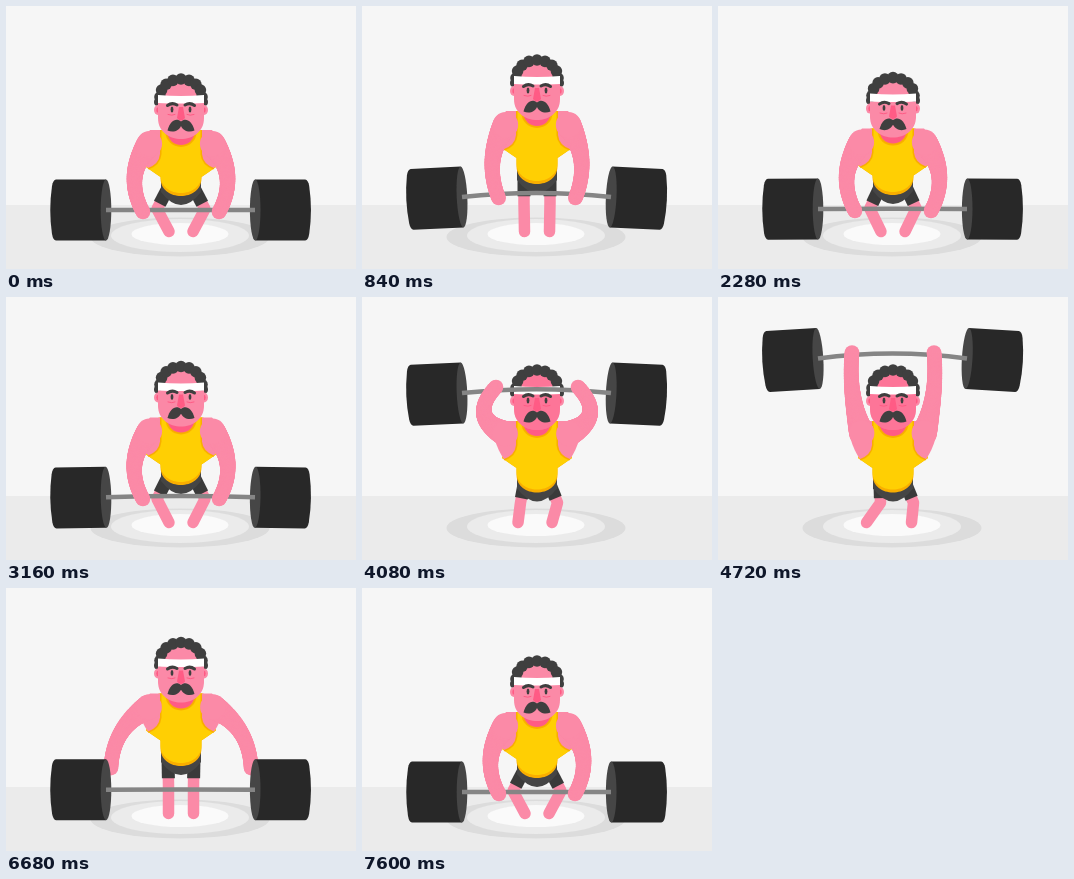
Animation, 350 px wide and 263 px high, one loop 7920 ms. Source, as an HTML page with a canvas:

```html
<!DOCTYPE html>
<html>
<head>
<meta charset="utf-8">
<title>Weightlifter</title>
<style>
html, body { margin: 0; width: 100%; height: 100%; overflow: hidden; background: #f6f6f6; }
canvas { display: block; width: 350px; height: 263px; }
</style>
</head>
<body>
<canvas id="stage"></canvas>
<script>
const LOOP = 7920, MID = 175, GROUND = 204;
const RELEASE = 6160, LAND = 6340, SETTLE = 6960, REGRIP = 7600;
const SKIN = '#fb8aa7', BLUSH = '#ff5b85', DARK = '#3f3f3f', SHADE = '#f9ae00';
const canvas = document.getElementById('stage');
const c = canvas.getContext('2d');
const dpr = window.devicePixelRatio || 1;
canvas.width = 350 * dpr;
canvas.height = 263 * dpr;
c.scale(dpr, dpr);

const clamp = k => Math.min(1, Math.max(0, k));
const span = (t, from, to) => clamp((t - from) / (to - from));
const ease = k => k < .5 ? 8 * k ** 4 : 1 - 8 * (1 - k) ** 4;
const mix = (a, b, k) => a.map((v, i) => v + (b[i] - v) * k);

// Head top, shirt bottom, knee spread, foot spread, lean, bar height, bar bow
const squat = [67, 190, 24, 12, 0, GROUND, 0];
const pull = [48, 178, 13, 12.5, 0, 191, 4];
const dip = [63.5, 188, 24, 12, 0, 200.3, 1.3];
const stretch = [42, 173, 13, 12.5, 0, 150, 4];
const rack = [74, 201, 21, 16, 0, 104, 3];
const push = [67, 195.5, 18.5, 17, 2, 96, 3.8];
const jerk = [54, 184, 14, 16, 2, 57, 2];
const split = [67, 195.5, 16.5, 22.5, 4, 61.5, 5];
const overhead = [48.5, 178, 12.5, 12.5, 0, 46, 3];
const keys = [
  [0, squat], [520, pull], [840, pull], [1600, squat],
  [2120, squat], [2640, pull], [2880, pull], [3160, dip], [3400, stretch], [3700, rack],
  [4000, rack], [4080, push], [4400, jerk], [4720, split],
  [4800, split], [5280, overhead], [SETTLE, overhead], [REGRIP, squat], [LOOP, squat]
];

function poseAt(t) {
  const i = keys.findIndex(key => key[0] > t);
  const [t0, a] = keys[i - 1], [t1, b] = keys[i];
  return mix(a, b, ease(span(t, t0, t1)));
}

// The dropped bar falls, then bounces out
function dropAt(t) {
  const fall = span(t, RELEASE, LAND) ** 1.35, u = span(t, LAND, SETTLE);
  const hop = 24 * Math.exp(-4 * u) * Math.abs(Math.sin(3 * Math.PI * u));
  const from = overhead[5];
  return [from + (GROUND - from) * fall - hop, 3 * (1 - fall) + hop / 10];
}

function handAt(t, barY, shoulder) {
  const up = clamp((GROUND - barY) / 108);
  const grip = [137 - 3 * up, barY + 2 - 8 * up];
  if (t < RELEASE) return grip;
  const angle = .38 + 2.57 * ease(span(t, RELEASE + 40, SETTLE));
  const swing = [shoulder[0] - 73 * Math.sin(angle), shoulder[1] - 73 * Math.cos(angle)];
  return mix(swing, grip, ease(span(t, SETTLE, REGRIP)));
}

function fill(color, d) {
  c.fillStyle = color;
  c.fill(new Path2D(d));
}
function line(color, width, d, cap = 'round') {
  c.strokeStyle = color;
  c.lineWidth = width;
  c.lineCap = cap;
  c.lineJoin = 'round';
  c.stroke(new Path2D(d));
}
function oval(color, x, y, rx, ry = rx) {
  c.fillStyle = color;
  c.beginPath();
  c.ellipse(x, y, rx, ry, 0, 0, 7);
  c.fill();
}
function mirrored(axis, draw) {
  for (const side of [1, -1]) {
    c.save();
    c.translate(axis, 0);
    c.scale(side, 1);
    c.translate(-axis, 0);
    draw();
    c.restore();
  }
}

function floor() {
  fill('#f6f6f6', 'M0 0H350V263H0Z');
  fill('#ebebeb', 'M0 199H350V263H0Z');
  oval('#dcdcdc', 174, 231, 89.5, 19.5);
  oval('#ebebeb', 174, 229.5, 69, 16.5);
  oval('#fafafa', 174, 228, 48.5, 11);
}

function legs(belly, kneeSpread, footSpread, lean) {
  const legOf = side => ({
    hip: [MID + side * 13, belly - 8],
    knee: [MID + side * kneeSpread + lean, (belly + 216) / 2],
    foot: [MID + side * footSpread - lean, 225.5]
  });
  const pair = [legOf(-1), legOf(1)];
  for (const { hip, knee, foot } of pair) line(SKIN, 11.5, `M${hip}L${knee}L${foot}`);
  for (const { hip, knee } of pair) line('#3a3a3a', 13, `M${hip}L${mix(hip, knee, .75)}`, 'butt');
  fill('#454545', `M155 ${belly - 16}H195V${belly - 4}Q175 ${belly + 22} 155 ${belly - 4}Z`);
}

function shirt(color, top, b) {
  fill(color, `M154 ${top}L140 ${top + 37}Q150 ${top + 44} 154.5 ${top + 47}V${b - 18}
    C154.5 ${b + 6} 195.5 ${b + 6} 195.5 ${b - 18}V${top + 47}
    Q200 ${top + 44} 210 ${top + 37}L196 ${top}Z`);
}

function torso(top, belly) {
  shirt(SHADE, top, belly);
  shirt('#ffcf03', top, belly - 3);
  oval(SHADE, MID, top + 2, 15.5, 15);
  oval(BLUSH, MID, top + 2, 13.5, 13);
}

// The elbow bends outward by whatever the reach leaves of the arm; the limb thickens upward
function arms([hx, hy], [sx, sy], top) {
  const dx = sx - hx, dy = sy - hy, reach = Math.hypot(dx, dy);
  const bend = Math.sqrt(Math.max(0, 42 ** 2 - reach ** 2 / 4));
  const out = -Math.sign(dy || 1) * bend / reach;
  const ex = (hx + sx) / 2 + Math.abs(dy) * -Math.abs(out);
  const ey = (hy + sy) / 2 - dx * out;
  mirrored(MID, () => {
    const armhole = `M154 ${top}V${top + 24}Q153 ${top + 34} 142 ${top + 38}`;
    line(SHADE, 3, armhole, 'butt');
    fill(SKIN, `${armhole}Q136 ${top + 30} 132 ${top + 16}L144 ${top}Z`);
    for (let k = 0; k <= 1; k += .01) {
      const [x, y] = mix(mix([hx, hy], [ex, ey], k), mix([ex, ey], [sx, sy], k), k);
      oval(SKIN, x, y, 7.3 + 5.5 * k ** 3);
    }
  });
}

function head(y, blink, flush) {
  c.save();
  c.translate(0, y - 67);
  mirrored(MID, () => {
    oval(DARK, 152, 96, 4);
    oval(SKIN, 152, 104, 4, 5);
    oval(BLUSH, 152, 104, 1.7, 2.7);
  });
  const face = 'M152 92C152 68 198 68 198 92V112C198 140 152 140 152 112Z';
  fill(SKIN, face);
  c.globalAlpha = .45 * flush;
  fill(BLUSH, face);
  c.globalAlpha = 1;
  for (let i = 0; i <= 8; i++) {
    const a = Math.PI * (1 + i / 8);
    oval(DARK, MID + 21 * Math.cos(a), 91 + 18 * Math.sin(a), 5.8);
  }
  fill('#fff', 'M152 89Q175 91 198 89V97Q175 98 152 97Z');
  mirrored(MID, () => {
    oval(DARK, 166, 103.5, 1.4, 3 * (1 - .85 * blink));
    line(DARK, 3, `M161.5 ${99.5 + blink}Q166 ${96 + blink} 171 ${99 + blink}`);
    line(BLUSH, 1, 'M162 108.5Q166 110 169 108.5');
  });
  fill(BLUSH, 'M173 101H177L179 112Q175 117 171 112Z');
  mirrored(MID, () =>
    fill(DARK, 'M175 115.5C170 111.5 164 115 161.5 124.5C167 127 173 125 175 120Z'));
  c.restore();
}

function barbell(y, bow) {
  mirrored(174.6, () => {
    c.save();
    c.translate(100, y);
    c.rotate(-bow * .012);
    fill('#282828', `M-50 -30.5H0V30.5H-50Q-53 30 -54 24Q-57.5 0 -54 -24Q-53 -30 -50 -30.5Z`);
    oval('#464646', 0, 0, 5.3, 30.5);
    c.restore();
  });
  line('#858585', 4.5, `M100 ${y}Q174.5 ${y - 2 * bow} 249 ${y}`, 'butt');
}

function draw(t) {
  const [headY, belly, knee, foot, lean, ...held] = poseAt(t);
  const [barY, bow] = t < RELEASE ? held : dropAt(t);
  const top = headY + 57, shoulder = [144, top + 13];
  const blink = Math.sin(span(t, 1640, 1840) * Math.PI);
  const parts = [
    () => barbell(barY, bow),
    () => arms(handAt(t, barY, shoulder), shoulder, top)
  ];
  if (t > RELEASE && t < 7300) parts.reverse();
  floor();
  legs(belly, knee, foot, lean);
  torso(top, belly);
  head(headY, blink, clamp((GROUND - barY) / 60));
  parts.forEach(part => part());
}

const start = performance.now();
function tick() {
  draw((performance.now() - start) % LOOP);
  requestAnimationFrame(tick);
}
tick();
</script>
</body>
</html>
```
